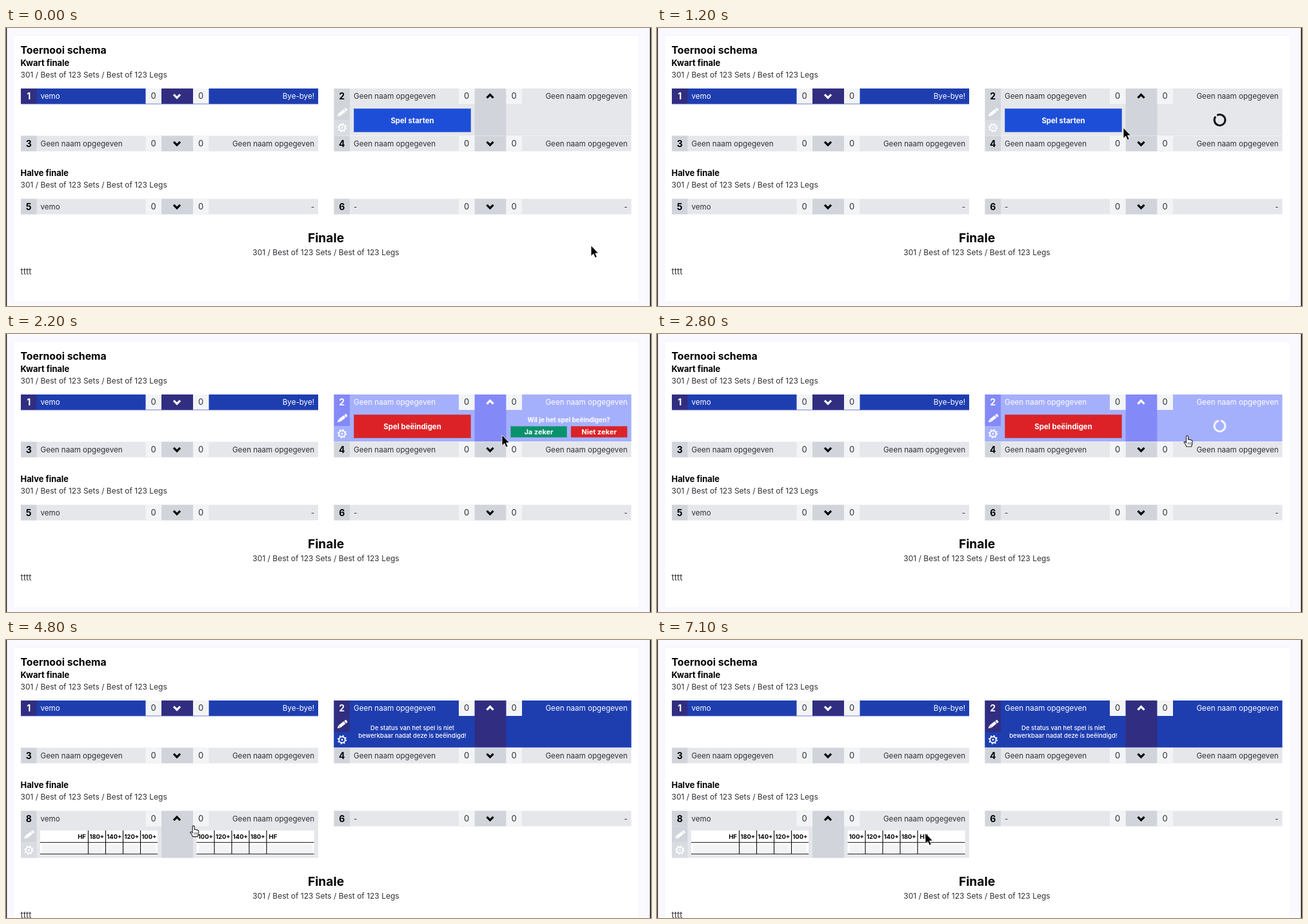
Write an HTML page that moves like this. It is 1000 px wide and 432 px high and loops after 7200 ms.

```html
<!DOCTYPE html>
<html lang="nl">
<head>
<meta charset="utf-8">
<title>Toernooi schema</title>
<style>
  html, body { margin: 0; width: 100%; height: 100%; overflow: hidden; background: #f9f9ff; }
  svg { display: block; width: 100%; height: 100%; }
  text { font-family: Inter, "Open Sans", sans-serif; white-space: pre; }
</style>
</head>
<body>
<svg id="stage" viewBox="0 0 1000 432">
  <g id="page"></g>
  <g id="spinner"><path d="M2.6 -8A8.4 8.4 0 1 1 -2.6 -8" fill="none" stroke-width="3" stroke-linecap="round"/></g>
  <g id="cursor"></g>
</svg>
<script>
const LOOP = 7200, STEP = 100;
const NAME = "Geen naam opgegeven";
const RULES = "301 / Best of 123 Sets / Best of 123 Legs";
const PLAYER = "vemo";

const themes = {
  idle:  { body: "#e5e7eb", dark: "#d1d5db", gear: "#d9dce1", ink: "#303036", strong: "#000" },
  live:  { body: "#a5b0fd", dark: "#8489f8", gear: "#a5b0fd", ink: "#fff", strong: "#fff" },
  ended: { body: "#1e3eb0", dark: "#312e81", gear: "#1e3eb0", ink: "#fff", strong: "#fff" }
};

// Start time, theme and panel of match 2
const phases = [
  [0, "idle", "start"],
  [1000, "idle", "start", "spin"],
  [1400, "live", "finish"],
  [1900, "live", "finish", "confirm"],
  [2700, "live", "finish", "spin"],
  [3200, "ended", "locked"]
];
const EXPAND = 4700;

// Time, x, y, pointer shape
const route = [
  [0, 907, 338, "arrow"], [200, 904, 330, "arrow"], [800, 690, 148, "hand"],
  [1000, 690, 148, "hand"], [1200, 723, 155, "arrow"], [1400, 712, 152, "hand"],
  [1700, 690, 147, "hand"], [1900, 690, 147, "hand"], [2100, 745, 155, "arrow"],
  [2200, 769, 157, "arrow"], [2500, 823, 156, "hand"], [2800, 822, 158, "hand"],
  [3100, 815, 165, "arrow"], [3900, 757, 234, "arrow"], [4100, 640, 255, "arrow"],
  [4400, 290, 278, "arrow"], [4500, 266, 278, "hand"], [4700, 266, 278, "hand"],
  [5000, 340, 310, "arrow"], [5300, 450, 330, "beam"], [5400, 460, 334, "beam"],
  [5500, 472, 333, "beam"], [5600, 475, 332, "beam"], [5700, 475, 332, "beam"],
  [5900, 462, 326, "beam"], [6100, 445, 310, "arrow"], [6500, 424, 306, "arrow"],
  [6800, 424, 306, "arrow"], [7100, 416, 300, "arrow"], [7200, 416, 300, "arrow"]
];

const pointers = {
  arrow: '<path d="M0 0V16.5L3.8 13L6.4 19L9.2 17.8L6.6 12H11.5Z" fill="#000" stroke="#fff" stroke-width=".8"/>',
  hand: '<path d="M-1.5 8V1Q0 -1 1.5 1V6Q3 5 4 6.5Q5.5 5.8 6.5 7.2Q8 6.8 8 8.5V12Q7.5 14 6.5 17H-1Q-2 14 -5 10.5Q-4.5 8 -1.5 11Z" fill="#fff" stroke="#222" stroke-width="1.1"/><path d="M1.5 10v4M3.8 10v4M6 10v4" stroke="#222" stroke-width=".7"/>',
  beam: '<path d="M-3.5 -8H-1.2L0 -7L1.2 -8H3.5M0 -7V7M-3.5 8H-1.2L0 7L1.2 8H3.5" fill="none" stroke="#222" stroke-width="1.3"/>'
};

const rect = (x, y, w, h, fill, extra = "") =>
  `<rect x="${x}" y="${y}" width="${w}" height="${h}" fill="${fill}" ${extra}/>`;
const label = (x, y, str, size = 12, { fill = "#303036", weight = 400, anchor = "start" } = {}) =>
  `<text x="${x}" y="${y}" font-size="${size}" font-weight="${weight}" fill="${fill}" text-anchor="${anchor}">${str}</text>`;
const bold = (x, y, str, size, anchor = "start", fill = "#000") =>
  label(x, y, str, size, { fill, anchor, weight: 700 });
const line = (d, color, width = 1) =>
  `<path d="${d}" fill="none" stroke="${color}" stroke-width="${width}"/>`;

function chevron(x, y, up, color) {
  const s = up ? -1 : 1;
  return line(`M${x - 5} ${y - 2.6 * s}L${x} ${y + 2.4 * s}L${x + 5} ${y - 2.6 * s}`, color, 3.2);
}

function pencil(x, y, color) {
  return `<g transform="translate(${x} ${y}) rotate(-38)" fill="${color}">
    <path d="M-10 0L-6 -2.4V2.4Z"/><rect x="-5.5" y="-2.4" width="10" height="4.8"/>
    <rect x="5.4" y="-2.4" width="3.4" height="4.8" rx="1"/></g>`;
}

function gear(x, y, color) {
  return `<g transform="translate(${x} ${y})" fill="none" stroke="${color}">
    <circle r="4.8" stroke-width="1.9"/><circle r="1.4" fill="${color}" stroke="none"/>
    <circle r="6.3" stroke-width="1.8" stroke-dasharray="2 2.948"/></g>`;
}

function match(x, y, num, left, right, theme = "idle", height = 0) {
  const c = themes[theme], open = height > 0, h = open ? height : 24;
  const base = y + 16;
  let out = rect(x, y, 461, h, c.body) + rect(x, y, 24.5, 24, c.dark) + rect(x + 218, y, 49, h, c.dark);
  for (const sx of [193.5, 267])
    out += rect(x + sx, y, 24.5, 24, "#f3f4f6") + label(x + sx + 12.2, base, "0", 13, { anchor: "middle" });
  out += bold(x + 12.2, base + 1, num, 14, "middle", c.strong);
  out += label(x + 30.5, base, left, 11.6, { fill: c.ink });
  out += label(x + 455, base, right, 11.6, { fill: c.ink, anchor: "end" });
  out += chevron(x + 242, y + 12, open, c.strong);
  if (open) {
    out += rect(x, y + 24, 24.5, 25, c.dark) + rect(x, y + 49, 24.5, h - 49, c.gear);
    out += pencil(x + 13, y + 37, "#fff") + gear(x + 12.5, y + 61, "#fff");
  }
  if (theme === "ended") out += line(`M${x} ${y + h}h461`, "#5360c4", 0.8);
  return out;
}

function button(x, y, w, h, str, size, fill, edge) {
  return rect(x + .5, y + .5, w - 1, h - 1, fill, `stroke="${edge}" stroke-dasharray="2 1"`) +
    bold(x + w / 2, y + h / 2 + size * .36, str, size, "middle", "#fff");
}

function panel(kind, extra) {
  if (kind === "locked") {
    const style = { fill: "#fff", weight: 500, anchor: "middle" };
    return label(630, 140, "De status van het spel is niet", 9.5, style) +
      label(630, 152, "bewerkbaar nadat deze is beëindigd!", 9.5, style);
  }
  let out = kind === "start"
    ? button(539, 125, 182, 37, "Spel starten", 11.4, "#1d4ed8", "#3c63cf")
    : button(539, 125, 182, 37, "Spel beëindigen", 11.4, "#dc2226", "#b84a68");
  if (extra === "confirm") {
    out += bold(872.5, 136.5, "Wil je het spel beëindigen?", 9.8, "middle", "#fff");
    out += button(782, 143, 88, 18, "Ja zeker", 11, "#08926b", "#3f9b9b");
    out += button(875.5, 143, 88, 18, "Niet zeker", 11, "#dc2226", "#b84a68");
  }
  return out;
}

function scoreTable(x, mirrored, focused) {
  const heads = ["100+", "120+", "140+", "180+"];
  if (!mirrored) heads.reverse();
  let out = rect(x, 296, 182, 37, "#fff");
  const hfX = mirrored ? x + 108 : x;
  out += mirrored ? bold(hfX + 4, 309, "HF", 9.6) : bold(x + 71, 309, "HF", 9.6, "end");
  out += rect(hfX + 3, 318, 69, 12, focused ? "#cbcfd6" : "#f3f4f6", 'rx="1"');
  heads.forEach((head, i) => {
    const cx = x + (mirrored ? 0 : 74) + i * 27;
    out += bold(cx + 13.8, 309, head, 9.4, "middle") + rect(cx + 3, 318, 21, 12, "#f3f4f6", 'rx="1"');
    const edge = mirrored ? cx + 27.5 : cx + .5;
    out += line(`M${edge} 296V333`, "#111", 1.2);
  });
  return out + line(`M${x} 314.5h182M${x} 332.5h182`, "#222", 1.1);
}

function page([, theme, kind, extra], opened, focused) {
  const ended = theme === "ended", shift = opened ? 49 : 0;
  return rect(0, 0, 1000, 432, "#f9f9ff") +
    rect(11.5, 11.5, 970, 414 + shift, "#fff", 'stroke="#f5f5fb"') +
    rect(0, 0, 1.3, 432, "#17171d") + rect(998.4, 0, 1.6, 432, "#17171d") +
    bold(22.5, 40, "Toernooi schema", 15.8) +
    bold(22.5, 58.5, "Kwart finale", 12.9) + label(22.5, 76.5, RULES) +
    match(23, 94, "1", PLAYER, "Bye-bye!", "ended") +
    match(508.5, 94, "2", NAME, NAME, theme, 73) + panel(kind, extra) +
    match(23, 167.5, "3", NAME, NAME) + match(508.5, 167.5, "4", NAME, NAME) +
    bold(22.5, 230, "Halve finale", 12.9) + label(22.5, 248, RULES) +
    match(23, 265.5, ended ? "8" : "5", PLAYER, ended ? NAME : "-", "idle", opened ? 73 : 0) +
    match(508.5, 265.5, "6", "-", "-") +
    (opened ? scoreTable(53, false) + scoreTable(295.5, true, focused) : "") +
    bold(496, 333 + shift, "Finale", 19.2, "middle") +
    label(496, 352.5 + shift, RULES, 12, { anchor: "middle" }) +
    label(22.5, 383 + shift, "tttt", 13);
}

const $ = id => document.getElementById(id);
let drawn = "";

function render(t) {
  const phase = phases.findLast(p => p[0] <= t);
  const opened = t >= EXPAND;
  const i = route.findLastIndex(p => p[0] <= t);
  const from = route[i], to = route[i + 1] || from;
  const k = to === from ? 0 : (t - from[0]) / (to[0] - from[0]);
  const x = from[1] + (to[1] - from[1]) * k, y = from[2] + (to[2] - from[2]) * k;
  const focused = opened && from[3] === "beam";

  const key = [phase[0], opened, focused].join();
  if (key !== drawn) {
    $("page").innerHTML = page(phase, opened, focused);
    drawn = key;
  }
  const spinning = phase[3] === "spin", live = phase[1] === "live";
  const angle = live ? (t - 2800) * .36 : (t - 1200) * .36 - 40;
  $("spinner").setAttribute("visibility", spinning ? "visible" : "hidden");
  $("spinner").setAttribute("stroke", live ? "#f4f5ff" : "#111");
  $("spinner").setAttribute("transform", `translate(872.5 143) rotate(${angle})`);
  $("cursor").innerHTML = pointers[from[3]];
  $("cursor").setAttribute("transform", `translate(${x} ${y})`);
}

function tick() {
  render(Math.floor(performance.now() % LOOP / STEP) * STEP);
  requestAnimationFrame(tick);
}
tick();
</script>
</body>
</html>
```
